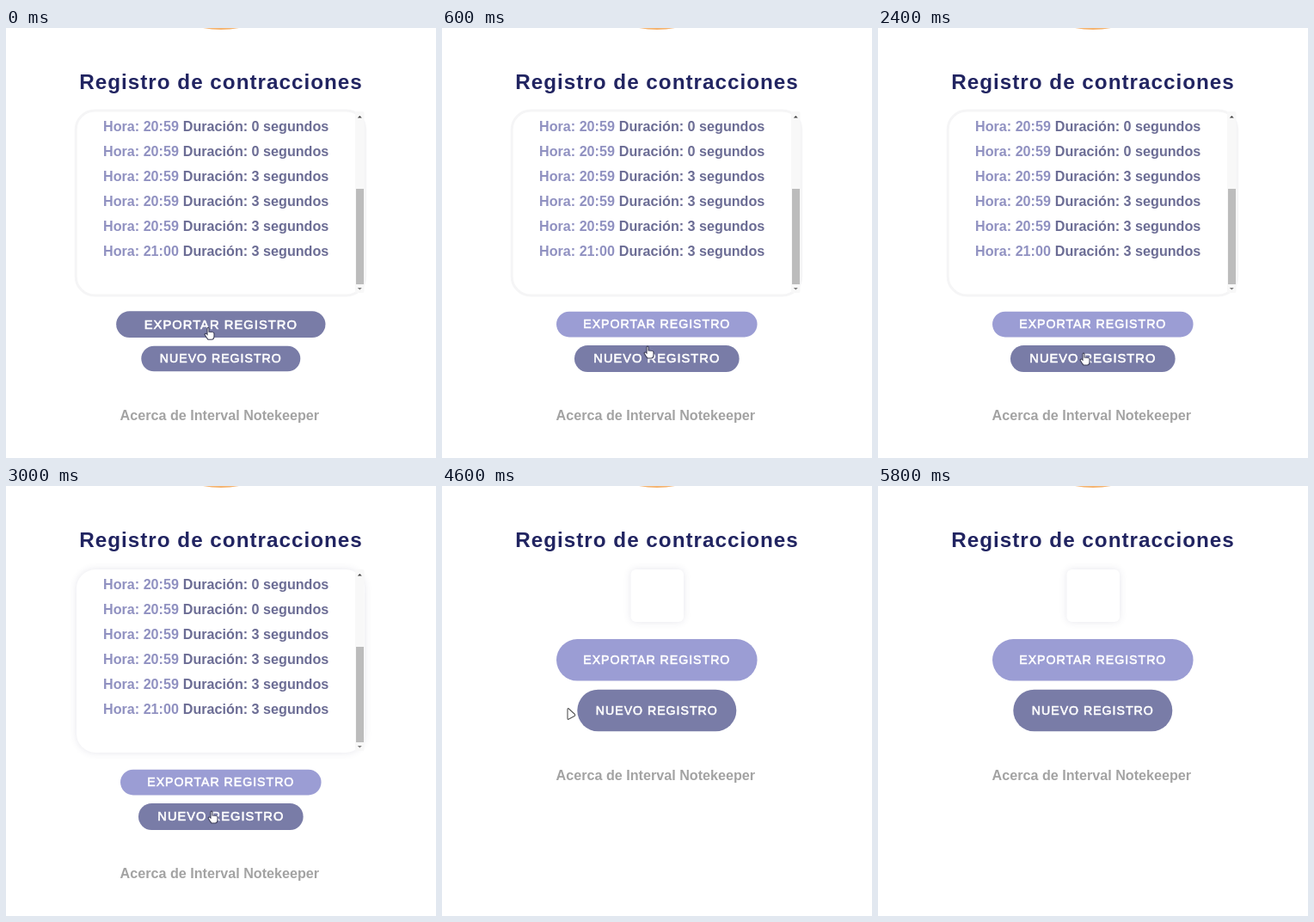
Write an HTML page with a canvas that moves like this. It is 500 px wide and 500 px high and loops after 6000 ms.

```html
<!DOCTYPE html>
<html lang="es">
<head>
<meta charset="utf-8">
<title>Registro de contracciones</title>
<style>
  html, body { margin: 0; width: 100%; height: 100%; overflow: hidden; background: #fff; }
  canvas { display: block; width: 500px; height: 500px; }
</style>
</head>
<body>
<canvas id="stage" width="500" height="500"></canvas>
<script>
const ctx = document.getElementById('stage').getContext('2d');
const LOOP = 6000, STEP = 100, CLEARED = 4000;
const FONT = '"Liberation Sans", Arial, sans-serif';
const LIGHT = [155, 157, 212], DARK = [121, 124, 167];

const rows = ['20:59 0', '20:59 0', '20:59 3', '20:59 3', '20:59 3', '21:00 3']
  .map(row => row.split(' '));

// Pointer keys: time, x, y
const handTrack = [[0, 237, 355.3], [100, 238, 360], [300, 240, 372], [600, 241, 377],
  [800, 241, 378], [1300, 241, 385]];
const leaveTrack = [[4400, 244, 385], [4600, 150, 265], [4800, 36, 181]];
const returnTrack = [[5200, 23, 340], [5400, 145, 421], [5700, 413, 495]];

const handShape = new Path2D('M-3 1V-6Q-2-8-1-6V-2Q5-2 5 0V3Q5 7 2 7H-2Q-4 5-6 1Q-5-1-3 1Z');
const arrowShape = new Path2D('M-4-5Q-4-7-2.5-6L4 0Q5.5 1.5 4 2.5L-2.5 6Q-4 7-4 5Z');

const clamp = v => Math.max(0, Math.min(1, v));
const mix = (a, b, k) => a + (b - a) * k;
const ease = (t, from, to) => {
  const k = clamp((t - from) / (to - from));
  return k * k * (3 - 2 * k);
};

function along(track, t) {
  let i = 0;
  while (i < track.length - 2 && t > track[i + 1][0]) i++;
  const [a, b] = [track[i], track[i + 1]];
  const k = clamp((t - a[0]) / (b[0] - a[0]));
  return [mix(a[1], b[1], k), mix(a[2], b[2], k)];
}

function text(str, x, y, size, color, { weight = 'bold', align = 'left', spacing = 0 } = {}) {
  ctx.font = `${weight} ${size}px ${FONT}`;
  ctx.textAlign = align;
  ctx.letterSpacing = spacing + 'px';
  ctx.fillStyle = color;
  ctx.fillText(str, x, y);
}

function box(x, y, w, h, r, fill) {
  ctx.beginPath();
  ctx.roundRect(x, y, w, h, r);
  ctx.fillStyle = fill;
  ctx.fill();
}

function triangle(x, y, dir, color) {
  ctx.beginPath();
  ctx.moveTo(x - 2.5, y + dir);
  ctx.lineTo(x + 2.5, y + dir);
  ctx.lineTo(x, y - 1.5 * dir);
  ctx.fillStyle = color;
  ctx.fill();
}

function shadowBox(x, y, w, h, r) {
  ctx.save();
  ctx.shadowColor = 'rgba(60, 60, 110, 0.13)';
  ctx.shadowBlur = 9;
  box(x, y, w, h, r, '#fff');
  ctx.restore();
}

function button(label, y, w, h, rgb, scale) {
  ctx.save();
  ctx.translate(249.8, y);
  ctx.scale(scale, scale);
  box(-w / 2, -h / 2, w, h, h / 2, `rgb(${rgb})`);
  text(label, 0, 4.8, 14.13, '#fff', { weight: 'normal', align: 'center', spacing: 1 });
  ctx.strokeStyle = '#fff';
  ctx.lineWidth = 0.6;
  ctx.strokeText(label, 0, 4.8);
  ctx.restore();
}

function list(t) {
  if (t < 2700) {
    box(81.2, 96, 336.5, 215, 22, '#fff');
    ctx.strokeStyle = '#f5f5f6';
    ctx.lineWidth = 3;
    ctx.stroke();
  } else {
    shadowBox(82, 97, 335, 213, 22);
  }
  box(406, 97, 10.5, 211, 2, '#f8f8f8');
  box(407, 187, 9, 111, 0, '#bcbcbc');
  triangle(411.3, 103.5, 1, '#404040');
  triangle(411.3, 303, -1, '#808080');
  rows.forEach(([hour, seconds], i) => {
    const y = 120 + 29 * i;
    text(`Hora: ${hour}`, 113, y, 16.15, '#9091c1');
    text(`Duración: ${seconds} segundos`, 205.8, y, 16.15, '#6b6c94');
  });
}

function pointer(shape, [x, y], color) {
  ctx.save();
  ctx.translate(x, y);
  ctx.fillStyle = '#fff';
  ctx.fill(shape);
  ctx.strokeStyle = color;
  ctx.lineWidth = 1.1;
  ctx.stroke(shape);
  ctx.restore();
}

function draw(t) {
  const cleared = t >= CLEARED;
  ctx.fillStyle = '#fff';
  ctx.fillRect(0, 0, 500, 500);

  ctx.beginPath();
  ctx.arc(250, -108, 110, 0, Math.PI * 2);
  ctx.fillStyle = '#f5b470';
  ctx.fill();
  text('Registro de contracciones', 250, 70.8, 24.25, '#212461', { align: 'center', spacing: 1 });

  if (cleared) shadowBox(219.5, 97, 61.5, 61, 6);
  else list(t);

  const left = ease(t, 100, 500);
  const entered = cleared ? 0 : ease(t, 200, 550);
  const exportColor = DARK.map((c, i) => Math.round(mix(c, LIGHT[i], left)));
  const height = cleared ? 48.5 : 29.7;
  button('EXPORTAR REGISTRO', cleared ? 202.3 : 344.6, 233.5, height, exportColor, mix(1.042, 1, left));
  button('NUEVO REGISTRO', cleared ? 261 : 384.5, 185, height, DARK, mix(1, 1.036, entered));
  text('Acerca de Interval Notekeeper', 132.6, cleared ? 342 : 456, 16.15, '#a3a3a3');

  if (!cleared) pointer(handShape, along(handTrack, t), '#3c3d58');
  else if (t < 4900) pointer(arrowShape, along(leaveTrack, t), '#555');
  else if (t >= 5200 && t < 5800) pointer(arrowShape, along(returnTrack, t), '#555');
}

const start = performance.now();
function frame() {
  const t = (performance.now() - start) % LOOP;
  draw(Math.floor(t / STEP) * STEP);
  requestAnimationFrame(frame);
}
frame();
</script>
</body>
</html>
```
